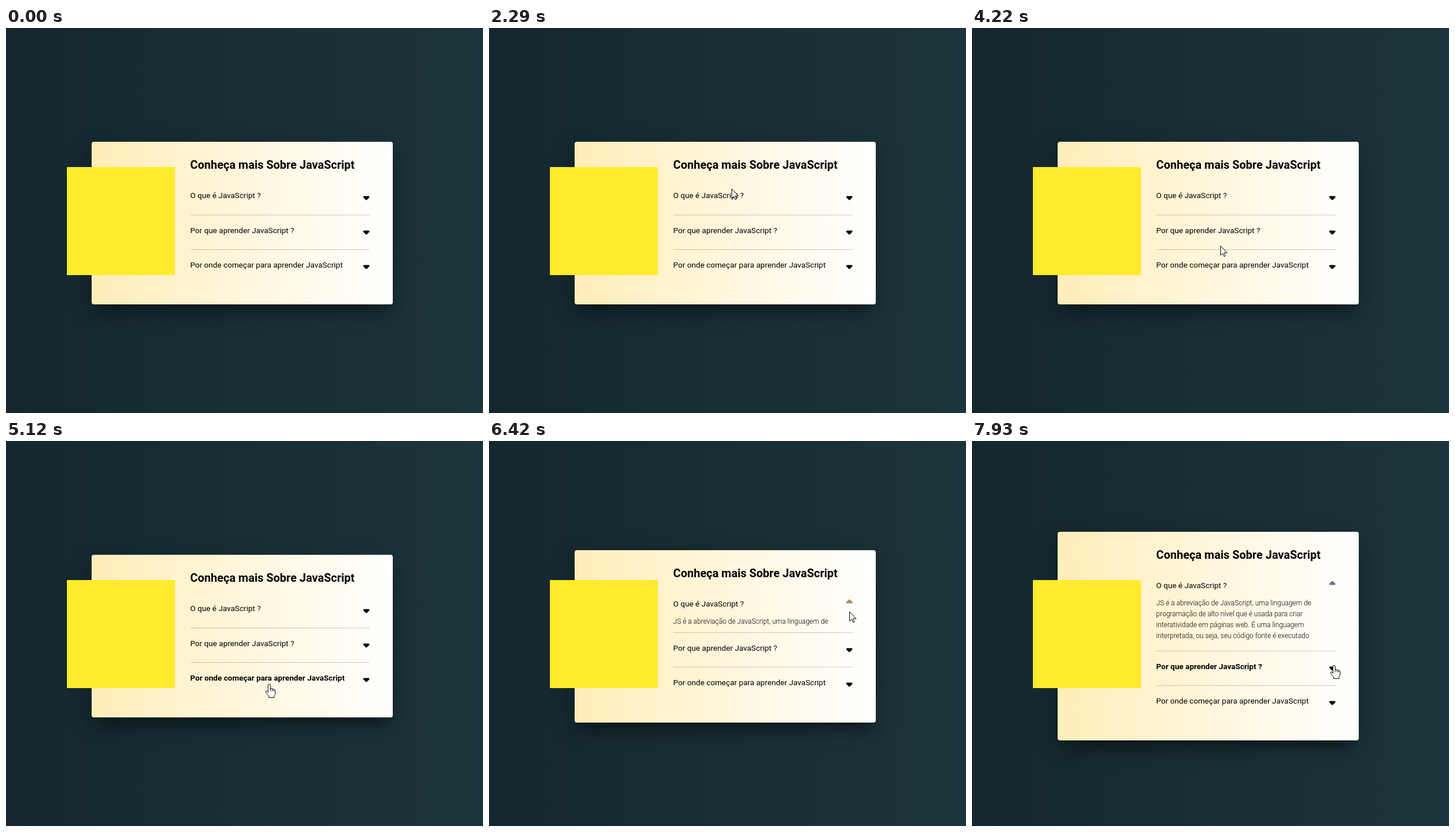
These frames come from a looping animation (830x670 px, 8 s). An HTML page:

```html
<!DOCTYPE html>
<html lang="pt-BR">
<head>
<meta charset="utf-8">
<title>Conheça mais Sobre JavaScript</title>
<style>
  html, body { margin: 0; width: 100%; height: 100%; overflow: hidden; }
  body {
    position: relative;
    font-family: Roboto, sans-serif;
    color: #000;
    background: linear-gradient(to right, #15272e, #1c343b);
  }
  body > * { position: absolute; }
  .card {
    left: 149px; width: 524px; border-radius: 4px;
    background: linear-gradient(to right, #ffedb9, #fff);
    box-shadow: 0 10px 40px rgba(0, 0, 0, .25), 0 20px 25px -12px rgba(0, 0, 0, .4);
  }
  .logo { left: 106px; top: 242px; width: 188px; height: 188px; background: #ffeb2e; }
  .title, .ask, .answer { left: 320.6px; white-space: pre; }
  .title { font: 600 20px/24px Roboto, sans-serif; }
  .ask { font-size: 13.6px; line-height: 16px; }
  .ask.hover { font-weight: 600; }
  .answer { width: 312px; overflow: hidden; font: 300 12px/19px Roboto, sans-serif; }
  .rule { left: 321px; width: 312px; height: 1px; background: rgba(0, 0, 0, .2); }
  svg { left: 0; top: 0; width: 830px; height: 670px; }
  .caret { fill: currentColor; stroke: currentColor; stroke-width: 3; stroke-linejoin: round; }
  .cursor { fill: #fff; stroke: #000; stroke-linejoin: round; stroke-linecap: round; }
</style>
</head>
<body>
<div class="card"></div>
<div class="logo"></div>
<div class="title">Conheça mais Sobre JavaScript</div>
<div class="ask">O que é JavaScript ?</div>
<div class="answer">JS é a abreviação de JavaScript, uma linguagem de
programação de alto nível que é usada para criar
interatividade em páginas web. É uma linguagem
interpretada, ou seja, seu código fonte é executado</div>
<div class="ask">Por que aprender JavaScript ?</div>
<div class="ask">Por onde começar para aprender JavaScript</div>
<div class="rule"></div>
<div class="rule"></div>
<svg viewBox="0 0 830 670">
  <path class="caret" d="M-4-2H4L0 2Z"/>
  <path class="caret" d="M-4-2H4L0 2Z"/>
  <path class="caret" d="M-4-2H4L0 2Z"/>
  <path class="cursor" id="arrow" d="M.5.5V16.5L4.2 13.2L6.6 18.7L8.9 17.7L6.5 12.2H11.5Z"/>
  <path class="cursor" id="hand" d="M-2 13.5V2Q-2 .5 0 .5T2 2V8Q5 6.8 5.2 8.6Q8 7.8 8 9.8Q10.5 9.3 10.5 11.5V16Q10.5 18.5 8.5 20.5V23.5H-.5V21Q-3 18.5-5.5 14.8Q-7 12.3-5 11.8Q-3.6 11.6-2 14.2ZM2 8V12M5.2 8.6V12M8 9.8V12"/>
</svg>
<script>
const LOOP = 8000, FRAME = 100;
const OPEN_AT = 6395, OPEN_MS = 225, OPEN_H = 80;

// Pointer moves; bow bends the path down (or up, if negative)
const moves = [
  { from: 580, to: 1290, x: 686, y: 275 },
  { from: 1390, to: 2180, x: 423, y: 276, bow: -33 },
  { from: 2290, to: 2490, x: 420, y: 289 },
  { from: 2890, to: 3620, x: 420, y: 352 },
  { from: 4020, to: 4600, x: 447, y: 412 },
  { from: 5120, to: 5820, x: 690, y: 308, bow: 88 },
  { from: 5930, to: 6220, x: 627, y: 297 },
  { from: 6320, to: 6620, x: 627, y: 297 },
  { from: 7120, to: 7930, x: 630, y: 390 }
];

const all = s => [...document.querySelectorAll(s)];
const [card, title, answer, arrow, hand] =
  ['.card', '.title', '.answer', '#arrow', '#hand'].map(s => document.querySelector(s));
const asks = all('.ask'), rules = all('.rule'), carets = all('.caret');
const clamp = v => Math.min(1, Math.max(0, v));
const mix = (a, b, p) => a + (b - a) * p;
const glide = p => 1 - (1 - p * p) ** 3;
const setTop = (el, y) => { el.style.top = y + 'px'; };
const place = (el, x, y, extra = '') => el.setAttribute('transform', `translate(${x} ${y})${extra}`);

// Screen time and pointer, held between the updates of each move
function sample(now) {
  let t = 0, x = 830, y = 675;
  for (const m of moves) {
    if (now < m.from) break;
    const steps = Math.round((m.to - m.from) / FRAME);
    const gap = (m.to - m.from) / steps;
    const k = Math.min(steps, Math.floor((now - m.from + 8) / gap));
    const e = glide((k + 1) / (steps + 1));
    t = m.from + k * gap;
    x = mix(x, m.x, e);
    y = mix(y, m.y, e) + (m.bow || 0) * 4 * e * (1 - e);
  }
  return { t, x: Math.round(x), y: Math.round(y) };
}

function draw(now) {
  const { t, x, y } = sample(now);
  const grow = Math.round(OPEN_H * (1 - (1 - clamp((t - OPEN_AT) / OPEN_MS)) ** 2));
  const half = Math.floor(grow / 2);
  const bases = [296 - half, 357 + half, 417 + half];

  setTop(card, 198 - half);
  card.style.height = 283 + grow + 'px';
  setTop(title, 226 - half);
  setTop(answer, bases[0] + 17);
  answer.style.height = (grow ? grow + 2 : 0) + 'px';
  rules.forEach((r, i) => setTop(r, 325 + 60 * i + half));

  let over = false;
  bases.forEach((base, i) => {
    const hit = t > 0 && x > 320 && x < 634 && y - base >= -14 && y - base <= 7;
    over = over || hit;
    asks[i].classList.toggle('hover', hit);
    setTop(asks[i], base - 13);
    const up = i === 0 && grow > 0;
    place(carets[i], 627, up ? base - 9 : 296 + 60 * i + half, up ? ' scale(1 -1)' : '');
  });

  const q = clamp((t - 6420) / 200);
  carets[0].style.color = grow
    ? `rgb(${mix(177, 116, q)}, ${mix(138, 116, q)}, ${mix(102, 138, q)})` : '#000';

  place(arrow, x, y);
  place(hand, x, y);
  arrow.style.display = t > 0 && !over ? '' : 'none';
  hand.style.display = over ? '' : 'none';
}

const start = performance.now();
function tick() {
  draw((performance.now() - start) % LOOP);
  requestAnimationFrame(tick);
}
tick();
</script>
</body>
</html>
```
